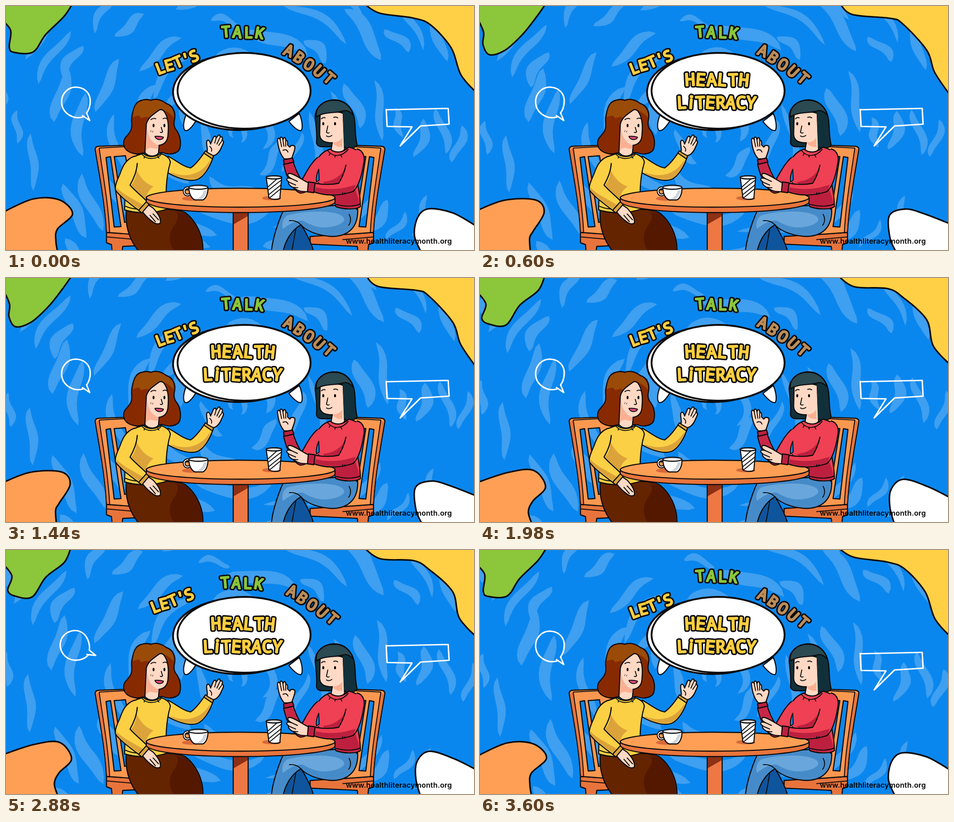
An HTML page for the animation above (3.63 s loop, 1034 by 541 pixels).

```html
<!DOCTYPE html>
<html lang="en">
<head>
<meta charset="utf-8">
<title>Let's talk about health literacy</title>
<style>
html, body { margin: 0; width: 100%; height: 100%; overflow: hidden; background: #0a87ee; }
svg { display: block; width: 100vw; height: 100vh; }
.ink { stroke: #0b0b0d; stroke-width: 2.4; stroke-linejoin: round; stroke-linecap: round; }
.line { fill: none; stroke: #0b0b0d; stroke-width: 2; stroke-linecap: round; stroke-linejoin: round; }
.chalk { fill: none; stroke: #fff; stroke-width: 3.2; stroke-linejoin: round; stroke-linecap: round; }
.word text { font: 400 34px "Noto Sans Mono", monospace; text-anchor: middle; stroke-linejoin: round; stroke-linecap: round; }
.word.big text { font-size: 38px; }
.word text.thin { font-family: Inter, sans-serif; }
.url { font: 600 16px Inter, sans-serif; letter-spacing: .15px; text-anchor: middle; }
</style>
</head>
<body>
<svg viewBox="0 0 1034 541" preserveAspectRatio="none">
  <defs>
    <g id="chair">
      <path class="ink" fill="#e8743c" d="M222 502L362 511V528L258 533L254 560H236L233 529L222 525Z"/>
      <path class="ink" fill="#fb9850" fill-rule="evenodd" d="M197 318Q197 312 204 311L263 309L290 320V507L222 502C219 440 207 380 197 318Z
        M221 336L231 334L254 489L239 490Z M239 334L264 332L288 470L262 480Z"/>
      <path fill="#e8743c" d="M199 318L206 316C215 380 226 440 229 501L223 501C220 440 208 380 199 318Z"/>
      <path class="line" d="M206 316C215 380 226 440 229 502M206 315L262 312M222 512L290 518"/>
    </g>
  </defs>
  <rect width="1034" height="541" fill="#0a87ee"/>
  <path id="swirl" fill="#3f9ff0"/>
  <g id="blobs"></g>

  <path id="round" class="chalk" d="M170 246C151 252 126 240 123 216C121 196 136 179 156 180C176 181 188 196 186 215C185 225 182 232 178 237L185 254L169 243"/>
  <path id="box" class="chalk" d="M840 230L977 227L979 262L916 266L871 310L897 268L842 267L840 229"/>

  <g class="ink" fill="#fff">
    <path d="M399 238C392 254 390 272 396 276C403 278 412 267 420 254ZM648 238C655 254 656 272 652 276C645 278 634 267 625 256Z"/>
    <ellipse cx="514" cy="191" rx="145" ry="84" stroke-width="4" style="stroke-width:4"/>
    <ellipse cx="526" cy="188" rx="147" ry="84" stroke-width="4" style="stroke-width:4"/>
  </g>

  <use href="#chair"/>
  <use href="#chair" transform="translate(1034) scale(-1 1)"/>

  <g id="redWoman">
    <path class="ink" fill="#468bc9" d="M614 450C603 475 590 510 586 545H634C638 525 643 505 652 486C668 502 695 510 722 511C757 510 778 490 777 452L760 440Z"/>
    <path class="ink" fill="#0f559d" d="M652 485C632 496 618 518 612 545H680C674 524 664 504 652 485Z"/>
    <path fill="#69a6db" d="M622 464C650 456 700 452 730 460C762 470 745 486 716 490C690 494 672 485 656 476C640 474 626 484 612 494C608 484 612 470 622 464Z"/>
    <path class="line" d="M652 486C645 477 634 475 626 476M758 462C763 470 762 480 757 486M640 496L632 541"/>
    <path class="ink" fill="#12303a" d="M724 208C747 207 764 224 769 246C773 264 770 286 776 309C768 317 755 317 744 312L698 312C691 312 686 308 686 302C688 280 684 262 683 245C684 223 702 209 724 208Z"/>
    <path class="ink" fill="#ffd9c4" d="M694 240L693 286C695 300 707 304 721 303L718 320C727 330 742 325 748 318L745 238C728 232 710 234 694 240Z"/>
    <path fill="#fbb093" d="M721 303C732 302 739 298 743 292V312C735 314 727 310 721 303Z"/>
    <path class="ink" fill="#2b4a52" d="M724 209C746 208 762 222 768 243C760 233 751 230 744 233C728 238 702 234 686 246C682 224 702 209 724 209Z"/>
    <path fill="#12303a" d="M744 235C753 232 764 238 768 250C770 270 768 290 773 308C764 314 753 313 747 310Z"/>
    <path class="line" d="M697 250Q701 246 705 248M724 247Q729 245 733 248M711 266L708 280Q711 283 714 281M708 288Q713 292 720 287"/>
    <ellipse cx="701" cy="261" rx="2.200" ry="3.600"/><ellipse cx="727" cy="261" rx="2.200" ry="3.600"/>
    <path class="ink" fill="#ef4054" d="M716 317C702 322 692 330 686 345L691 398L724 425L729 445C748 452 774 451 783 445C783 420 777 398 776 382L790 350C792 330 778 317 757 313C745 326 727 327 716 317Z"/>
    <path fill="#bd203f" d="M700 390C722 388 742 378 750 356C750 380 750 395 742 408L770 402C776 420 782 432 781 444C766 449 746 449 731 444L726 424Z"/>
    <path class="line" d="M710 320C722 336 742 335 756 318M716 327L714 331M727 331V335M740 331L742 335M729 440C748 445 770 445 782 439"/>
  </g>

  <g id="yellowWoman">
    <path class="ink" fill="#642400" d="M266 452C262 490 274 520 294 545H435C437 510 420 476 396 458C375 448 320 450 305 453Z"/>
    <path fill="#541800" d="M362 456C390 456 380 474 368 492C358 510 362 528 370 541H433C435 510 418 477 394 459Z"/>
    <path class="ink" fill="#872a02" d="M320 209C334 203 348 211 354 216C367 220 374 232 373 246C372 256 369 262 374 272C384 284 388 300 384 316C380 328 360 331 346 325L302 326C288 331 262 326 260 306C258 290 274 286 277 272C280 262 275 254 279 240C282 225 286 212 300 209C308 206 314 207 320 209Z"/>
    <path fill="#9a4b08" d="M320 211C334 205 348 213 354 218C366 222 372 234 371 248C364 238 353 232 342 228C330 234 324 246 315 248C308 242 304 250 298 248C293 238 287 246 280 246C282 226 287 214 300 211C308 208 314 209 320 211Z"/>
    <path class="ink" fill="#ffd9c4" d="M338 231C326 240 314 246 310 262L307 325C316 336 332 334 337 326L338 309C352 307 358 297 358 283C360 262 357 243 348 232Q343 228 338 231Z"/>
    <path fill="#fbb093" d="M312 268C312 288 322 304 337 309V316C324 318 315 308 309 322Z"/>
    <path class="line" d="M320 252Q325 248 331 250M347 250Q351 247 355 250M343 269L346 279Q343 282 341 280"/>
    <path class="line" style="stroke-width:1" d="M319 279L321 276M323 280L325 277"/>
    <ellipse cx="326" cy="265" rx="2.100" ry="3.700"/><ellipse cx="350" cy="265" rx="2.100" ry="3.700"/>
    <path class="ink" fill="#e0487c" style="stroke-width:2" d="M329 289Q340 288 348 291Q346 297 337 296Q331 295 329 289Z"/>
    <path class="ink" fill="#fbd045" d="M358 333C374 341 392 357 408 359C418 352 430 337 438 325L457 337C450 358 437 378 424 384C410 390 384 385 358 370Z"/>
    <path fill="#dca33a" d="M364 369C392 380 426 378 448 346L453 340C448 358 437 377 424 382C408 387 382 382 364 371Z"/>
    <path class="ink" fill="#fbd045" d="M303 327C288 331 273 337 265 348L262 452C288 461 330 460 356 450C352 420 353 382 363 347C363 336 350 330 342 327C330 336 314 336 303 327Z"/>
    <path fill="#dca33a" d="M276 398C286 388 290 370 286 360C298 382 308 394 326 400C316 408 310 416 308 430L300 426Z"/>
    <path class="ink" fill="#fbd045" d="M284 333C266 339 258 354 252 372C244 390 240 400 242 408C252 423 276 440 293 453L312 434C300 421 285 410 274 397C282 383 289 368 290 349"/>
    <path fill="#dca33a" d="M244 402C258 418 282 428 302 441L294 450C276 438 254 422 244 408Z"/>
    <path class="line" d="M300 328C310 342 334 341 344 328M307 334L305 337M335 334L338 337M264 444Q278 450 290 450"/>
    <path class="ink" fill="#ffd9c4" d="M300 454C306 463 318 475 328 481C335 485 344 483 341 476C341 468 334 458 325 448L313 440Z"/>
    <path class="line" d="M318 464L330 478M325 461L337 474"/>
    <path class="ink" fill="#dca33a" d="M293 453L311 433L316 440L300 459ZM437 326L441 321L459 332L456 339Z"/>
    <path class="ink" fill="#ffd9c4" d="M444 324C447 316 441 306 444 299C447 295 451 300 452 306L458 292C460 287 465 288 464 293L468 288C470 284 474 286 473 291C477 288 480 292 477 298C483 298 480 305 477 311C473 321 468 330 458 332Z"/>
    <path class="line" d="M464 294L461 304M472 293L466 306M477 299L470 309M450 311Q456 316 454 322"/>
  </g>

  <g id="table">
    <path class="ink" fill="#ee7843" d="M502 450H535V545H502Z"/>
    <path fill="#8d3015" d="M503 457H534V466L503 484Z"/>
    <path class="ink" fill="#e8743c" d="M310 424V434C318 449 410 458 518 458S716 449 727 436V424Z"/>
    <ellipse class="ink" cx="518.500" cy="425" rx="208.500" ry="21" fill="#ff9f55"/>
    <ellipse cx="411" cy="427" rx="22" ry="5" fill="#d8693a"/><ellipse cx="587" cy="426" rx="21" ry="5" fill="#d8693a"/>
    <ellipse cx="401" cy="411" rx="7.500" ry="8" fill="none" stroke="#0b0b0d" stroke-width="6"/>
    <ellipse cx="401" cy="411" rx="7.500" ry="8" fill="none" stroke="#fff" stroke-width="2"/>
    <path class="ink" fill="#fff" d="M404 402C404 420 412 428 418 430H435C442 427 447 415 446 402Z"/>
    <path fill="#cfd3dc" d="M444 408C442 420 436 426 432 428H420C430 424 434 420 437 409Z"/>
    <ellipse class="ink" cx="425" cy="402" rx="21" ry="4.500" fill="#e7e9ee"/>
    <path class="ink" fill="#fff" d="M575 380L581 426Q593 431 605 427L609 380Z"/>
    <path class="line" d="M579 401L598 384M580 408L607 387M581 418L607 397M583 425L606 406"/>
    <ellipse class="ink" cx="592" cy="380" rx="17" ry="3.500" fill="#e7e9ee"/>
  </g>

  <g id="redArms">
    <path class="ink" fill="#c92745" d="M613 350L634 344C639 360 645 374 653 386C662 372 672 350 688 336L691 384C682 400 668 414 650 415C632 408 620 380 613 350Z"/>
    <path fill="#ef4054" d="M656 386C664 370 674 350 690 336L704 334L694 388C682 398 674 404 664 406Z"/>
    <path class="line" d="M691 362Q684 378 686 390L692 386Z" style="fill:#0a87ee"/>
    <path class="ink" fill="#ffd9c4" d="M615 339C606 330 602 316 600 300C599 292 604 291 606 297C604 288 611 289 612 297C614 289 618 291 618 298C622 297 623 302 622 308L627 313C629 308 634 308 638 311C640 318 634 328 631 339Z"/>
    <path class="line" d="M606 298L609 312M612 298L614 311M618 299V311M612 320Q620 316 623 324"/>
    <path class="ink" fill="#bd203f" d="M613 341L633 337L636 346L615 351Z"/>
    <path class="ink" fill="#ef4054" d="M776 317C790 321 794 336 790 351C786 376 779 400 767 411C740 421 708 422 680 412L682 393C705 397 722 396 735 393C742 382 748 367 751 353"/>
    <path fill="#bd203f" d="M684 402C720 410 752 404 772 396C771 404 768 408 765 410C740 419 708 420 682 411Z"/>
    <path class="line" d="M744 418V414M748 417L749 414"/>
    <path class="ink" fill="#ffd9c4" d="M668 392C655 386 636 371 626 371C619 373 624 380 631 383C620 379 616 385 625 390C621 394 630 401 637 404C648 413 658 411 668 412Z"/>
    <path class="line" d="M631 383L644 389M626 391L640 397M634 402L645 403"/>
    <path class="ink" fill="#bd203f" d="M668 390L683 392L680 414L666 412Z"/>
  </g>

  <text class="url" x="868" y="527">www.healthliteracymonth.org</text>
  <g id="lets" class="word"></g>
  <g id="talk" class="word"></g>
  <g id="about" class="word"></g>
  <g id="health" class="word big"></g>
  <g id="literacy" class="word big"></g>
</svg>
<script>
const $ = id => document.getElementById(id);
const LOOP = 3630, BOIL = 180, BOB = 300, STATES = 5;
const CX = 515, CY = 285, TAU = 2 * Math.PI;

function seeded(s) {
  return () => {
    s = (s + 0x6D2B79F5) | 0;
    let v = Math.imul(s ^ (s >>> 15), 1 | s);
    v = (v + Math.imul(v ^ (v >>> 7), 61 | v)) ^ v;
    return ((v ^ (v >>> 14)) >>> 0) / 2 ** 32;
  };
}

// A brush streak that bends around the centre of the stage, pointed at both ends.
function streak(start, sweep, radius, drift, width, bend) {
  const outer = [], inner = [];
  for (let i = 0; i <= 12; i++) {
    const u = i / 12, a = start + sweep * u, h = width / 2 * Math.sin(Math.PI * u) ** .55;
    const r = radius + drift * (u - .5) + 6 * Math.sin(TAU * u + bend);
    const at = q => `${(CX + q * Math.cos(a)).toFixed(1)} ${(CY + q * Math.sin(a)).toFixed(1)}`;
    outer.push(at(r + h));
    inner.unshift(at(r - h * .8));
  }
  return 'M' + outer.concat(inner).join('L') + 'Z';
}

// The same rings of streaks in every state, each one nudged a little.
function swirl(state) {
  const place = seeded(7), nudge = seeded(state + 40);
  let d = streak(2.6, 5, 17, 4, 16, 0);
  for (let r = 80; r < 650; r += 48) {
    const first = place() * TAU;
    for (let a = 0; a < TAU - 60 / r;) {
      const sweep = Math.min((70 + 110 * place()) / r, 1.6);
      d += streak(first + a + (nudge() - .5) * 40 / r, sweep, r + 24 * (place() - .5) + 12 * (nudge() - .5),
                  50 * (place() - .5), 14 + 18 * place() + 6 * nudge(), TAU * place());
      a += sweep + (50 + 110 * place()) / r;
    }
  }
  return d;
}

// Smooth line through x, y pairs.
function curve(p) {
  const n = p.length / 2, clamp = i => 2 * Math.max(0, Math.min(n - 1, i));
  const X = i => p[clamp(i)], Y = i => p[clamp(i) + 1];
  let d = `M${p[0]} ${p[1]}`;
  for (let i = 0; i < n - 1; i++)
    d += `C${X(i) + (X(i + 1) - X(i - 1)) / 6} ${Y(i) + (Y(i + 1) - Y(i - 1)) / 6} ` +
         `${X(i + 1) - (X(i + 2) - X(i)) / 6} ${Y(i + 1) - (Y(i + 2) - Y(i)) / 6} ${X(i + 1)} ${Y(i + 1)}`;
  return d;
}
const wobble = (p, state) => p.map((v, i) => v + 3 * Math.sin(i * 1.3 - state * TAU / STATES));

const states = [...Array(STATES).keys()], swirls = states.map(swirl);
const blobs = [
  ['#8cc63a', '-30 -40', [147,-8, 126,26, 90,63, 57,101, 20,105, 6,88, 10,57, -8,28]],
  ['#ffd046', '1070 -40', [791,-8, 824,18, 902,26, 935,41, 986,95, 1004,150, 1042,198]],
  ['#ff9f55', '-30 580', [-8,455, 58,430, 120,429, 144,460, 116,497, 109,518, 114,550]],
  ['#fff', '1070 580', [1042,487, 986,461, 937,449, 907,467, 905,512, 920,550]]
].map(([fill, corner, points]) => {
  const el = document.createElementNS('http://www.w3.org/2000/svg', 'path');
  el.setAttribute('class', 'ink');
  el.setAttribute('fill', fill);
  el.style.strokeWidth = 3.4;
  $('blobs').append(el);
  return { el, shapes: states.map(s => curve(wobble(points, s)) + `L${corner}Z`) };
});

// Spreads letters from one point to another, tilting from one angle to the other with a hand-drawn sway.
function write(id, word, color, cap, [x1, y1, tilt1], [x2, y2, tilt2], count = word.length) {
  const room = c => "i'".includes(c) ? .8 : 1;
  const along = [...word].map((c, i) => [...word].slice(0, i).reduce((sum, k, j) => sum + (room(k) + room(word[j + 1])) / 2, 0));
  const total = along[along.length - 1];
  const layer = (paint, width) => [...word].slice(0, count).map((c, i) => {
    const u = along[i] / total, sway = i % 2 ? 4 : -3;
    const x = x1 + (x2 - x1) * u, y = y1 + (y2 - y1) * u, tilt = tilt1 + (tilt2 - tilt1) * u + sway;
    return `<text class="${c === 'i' ? 'thin' : ''}" transform="translate(${x} ${y}) rotate(${tilt})" y="${cap / 2}" ` +
           `fill="${paint}" stroke="${paint}" stroke-width="${width}">${c}</text>`;
  }).join('');
  $(id).innerHTML = layer('#0b0b0d', 9.5) + layer(color, 3.2);
}
write('lets', "LET'S", '#ffcf3f', 24, [341, 138, -18], [415, 111, -22]);
write('talk', 'TALK', '#8cc63a', 24, [486, 57, -2], [561, 60, 6]);
write('about', 'ABOUT', '#bd8d57', 24, [625, 99, 26], [714, 160, 44]);

const shown = {};
const changed = (key, value) => shown[key] !== value && ((shown[key] = value), true);

function draw(t) {
  const tick = Math.floor(t / BOIL);
  if (changed('tick', tick)) {
    const state = tick % STATES, zoom = 1 - .035 * Math.exp(-tick * BOIL / 1100);
    $('swirl').setAttribute('d', swirls[state]);
    $('swirl').setAttribute('transform', `translate(${CX} ${CY}) scale(${zoom}) translate(${-CX} ${-CY})`);
    blobs.forEach(b => b.el.setAttribute('d', b.shapes[state]));
  }
  const up = Math.floor(t / BOB) % 2;
  if (changed('up', up)) {
    const move = (id, to) => $(id).setAttribute('transform', up ? to : '');
    move('lets', 'translate(-11 -12)');
    move('talk', 'translate(-2 15)');
    move('about', 'translate(7 -8)');
    move('round', 'translate(-2 -1) rotate(-28 154 214)');
    move('box', 'translate(0 -17.5)');
  }
  const count = Math.max(0, Math.min(14, Math.floor((Math.floor(t / 60) - 1) * 14 / 6)));
  if (changed('count', count)) {
    write('health', 'HEALTH', '#ffcf3f', 27, [464, 163, 0], [583, 164, 2], Math.min(count, 6));
    write('literacy', 'LiTERACY', '#ffcf3f', 27, [446, 214, 0], [599, 214, 2], Math.max(0, count - 6));
  }
}
function frame() {
  draw(performance.now() % LOOP);
  requestAnimationFrame(frame);
}
frame();
</script>
</body>
</html>
```
